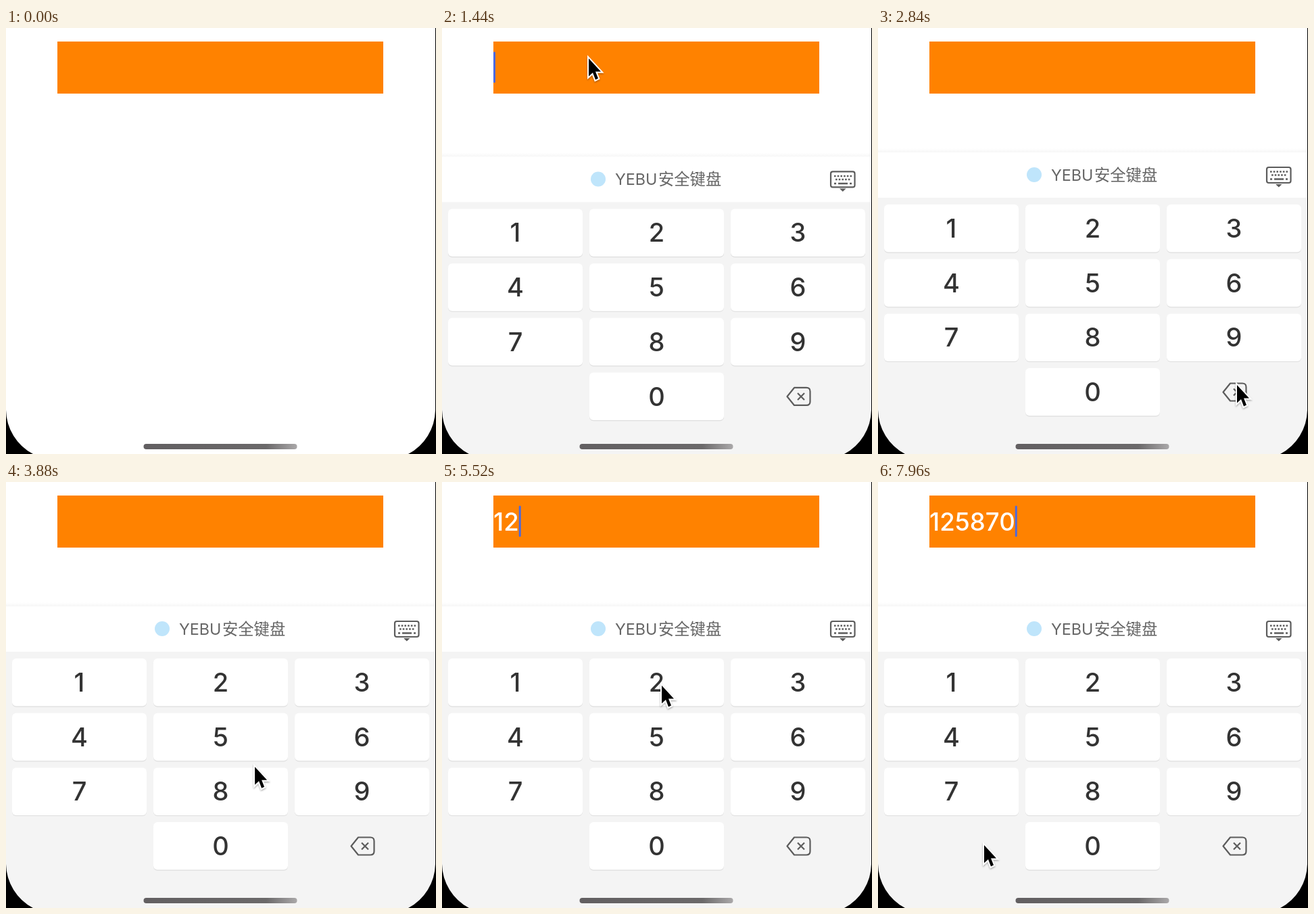
An HTML page that plays this animation: 636 by 630 pixels, repeating every 8000 ms.

```html
<!DOCTYPE html>
<html lang="zh">
<head>
<meta charset="utf-8">
<title>Secure keypad</title>
<style>
  html, body { margin: 0; width: 100%; height: 100%; overflow: hidden; background: #fff; }
  svg { display: block; width: 636px; height: 630px; }
  text { font-family: Inter, "Noto Sans CJK SC", "Noto Sans CJK JP", sans-serif; }
  .key text { font-size: 38px; font-weight: 500; fill: #333; text-anchor: middle; }
  .label { font-size: 23.3px; fill: #666; }
  .icon { fill: none; stroke: #5c5c5c; stroke-width: 2.2; stroke-linejoin: round; }
</style>
</head>
<body>
<svg viewBox="0 0 636 630">
  <defs>
    <linearGradient id="edge" x2="0" y2="1">
      <stop stop-opacity="0"/><stop offset="1" stop-opacity=".035"/>
    </linearGradient>
    <linearGradient id="bar">
      <stop stop-color="#625f61"/><stop offset=".8" stop-color="#6b696a"/><stop offset="1" stop-color="#aaa8a9"/>
    </linearGradient>
    <filter id="soft" x="-50%" y="-50%" width="200%" height="200%">
      <feDropShadow dx="0" dy="1.5" stdDeviation="1.2" flood-opacity=".35"/>
    </filter>
  </defs>

  <rect x="76" y="20" width="482" height="77" fill="#ff8200"/>
  <text id="value" x="76" y="72" font-size="36.6" font-weight="500" fill="#fff"></text>
  <rect id="caret" y="35" width="3" height="46" rx="1.5" fill="#4b69df"/>

  <g id="pad">
    <rect y="178" width="636" height="6" fill="url(#edge)"/>
    <rect y="184" width="636" height="68" fill="#fff"/>
    <rect y="251" width="636" height="390" fill="#f4f4f4"/>
    <circle cx="231" cy="217" r="11" fill="#bfe5fb"/>
    <text class="label" x="256" y="225.5">YEBU</text>
    <text class="label" x="320" y="225.5">安全键盘</text>
    <g class="icon">
      <rect x="575" y="206" width="35.5" height="23" rx="3"/>
      <path d="M580 212.5H606M582 217.5H605" stroke-width="2.6" stroke-dasharray="2.6 2.1"/>
      <path d="M580 223.5h3M586 223.5h14M603 223.5h3" stroke-width="2.6"/>
      <path d="M588 231h9.5l-4.7 4.5z" fill="#5c5c5c" stroke="none"/>
      <path d="M521 525.5H539Q544.5 525.5 544.5 531V546Q544.5 551.5 539 551.5H521L510.5 538.5Z"/>
      <path d="M526 533.5l10 10m0-10l-10 10"/>
    </g>
  </g>

  <rect x="203.5" y="615" width="227" height="8" rx="4" fill="url(#bar)"/>
  <path d="M0 565A75 75 0 0 0 40 630H0ZM635 0V565A75 75 0 0 1 595 630H636V0Z"/>
  <path id="arrow" d="M0 0V26.500L6 21L10 31.500L14 29.500L10 19.500H18Z"
        stroke="#fff" stroke-width="4" paint-order="stroke" filter="url(#soft)"/>
</svg>
<script>
const LOOP = 8000, STEP = 40, OPEN = 1100, FOCUS = 1120;
const $ = id => document.getElementById(id);
const value = $("value"), caret = $("caret"), pad = $("pad"), arrow = $("arrow");

function add(parent, tag, attrs) {
  const el = document.createElementNS("http://www.w3.org/2000/svg", tag);
  for (const name in attrs) el.setAttribute(name, attrs[name]);
  return parent.appendChild(el);
}

const keys = [];
for (let i = 1; i <= 10; i++) {
  const cell = i < 10 ? i - 1 : 10, digit = i % 10;
  const x = 9 + cell % 3 * 209, y = 261 + Math.floor(cell / 3) * 80.7;
  const key = add(pad, "g", { class: "key" });
  const box = { x, y, width: 199, height: 70.5, rx: 6 };
  add(key, "rect", { ...box, y: y + 1.2, fill: "#dedede" });
  const face = add(key, "rect", box);
  add(key, "text", { x: x + 99.5, y: y + 49 }).textContent = digit;
  keys[digit] = { face, spot: [x + 113, y + 31] };
}

// digit, finger down, digit entered
const taps = [[1, 4240, 4760], [2, 5320, 5480], [5, 5720, 5800], [8, 6160, 6240], [7, 6960, 7120], [0, 7600, 7680]];

// pointer moves: start, end, destination
const home = [235, 339];
const moves = [
  [240, 360, [274, 244]], [560, 920, [217, 45]], [1960, 2800, [531, 528]],
  [3600, 4200, [169, 291]], [4960, 5240, [325, 301]], [5560, 5680, keys[5].spot],
  [5960, 6120, keys[8].spot], [6400, 6740, keys[7].spot], [7320, 7560, keys[0].spot],
  [7760, 7960, [157, 537]]
];

const clamp = v => Math.max(0, Math.min(1, v));
const ease = u => u * u * (3 - 2 * u);

function pointer(t) {
  return moves.reduce((from, [start, end, to]) => {
    const u = ease(clamp((t - start) / (end - start)));
    return from.map((v, i) => v + (to[i] - v) * u);
  }, home);
}

function blink(age) {
  const u = age % 1060;
  return u < 480 ? clamp((480 - u) / 100) : clamp((u - 960) / 100);
}

function draw(t) {
  // critically damped spring
  const s = Math.max(0, t - OPEN) / 1000 * 18.26;
  const drop = t < OPEN ? 460 : 446 * (1 + s) * Math.exp(-s);
  pad.setAttribute("transform", `translate(0 ${drop.toFixed(2)})`);

  const entered = taps.filter(tap => t >= tap[2]);
  value.textContent = entered.map(tap => tap[0]).join("");
  const since = entered.length ? entered.at(-1)[2] : FOCUS;
  caret.setAttribute("x", 76 + (entered.length ? value.getComputedTextLength() : 0));
  caret.setAttribute("opacity", t < FOCUS ? 0 : blink(t - since));

  keys.forEach(({ face }, digit) => {
    const held = taps.some(([d, down, up]) => d === digit && t >= down && t < up - STEP);
    face.setAttribute("fill", held ? "#dcdcdc" : "#fff");
  });

  arrow.setAttribute("visibility", t < 80 ? "hidden" : "visible");
  arrow.setAttribute("transform", `translate(${pointer(t)})`);
}

const start = performance.now();
function tick() {
  const t = (performance.now() - start) % LOOP;
  draw(Math.floor(t / STEP) * STEP);
  requestAnimationFrame(tick);
}
tick();
</script>
</body>
</html>
```
